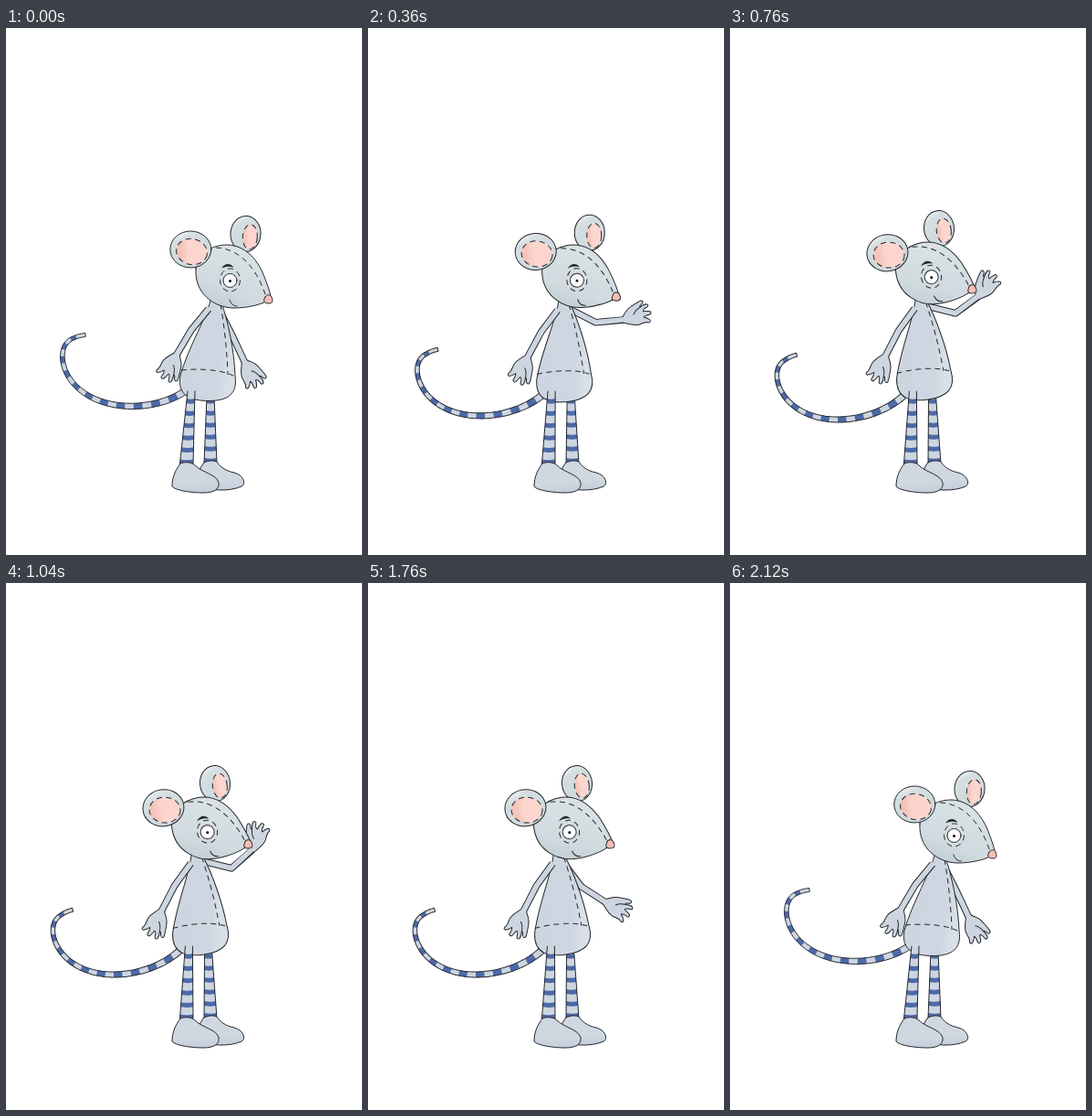
These frames come from a looping animation (390x576 px, 3600 ms). An HTML page:

```html
<!DOCTYPE html>
<html lang="en">
<head>
<meta charset="utf-8">
<title>Waving mouse</title>
<style>
html, body { margin: 0; width: 100%; height: 100%; overflow: hidden; background: #fff; }
svg { display: block; width: 100%; height: 100%; }
.ln { stroke: #25282c; stroke-width: 1; stroke-linejoin: round; stroke-linecap: round; }
.no { fill: none; }
.dash { stroke-dasharray: 6 4.5; stroke-linecap: butt; }
.skin { fill: #cdd6e0; }
.blue { fill: #4d69a9; }
.limb { fill: none; stroke-linejoin: round; }
.edge { stroke: #25282c; stroke-width: 7.6; }
.core { stroke: #cdd6e0; stroke-width: 5.6; }
</style>
</head>
<body>
<svg viewBox="0 0 390 576">
  <defs>
    <linearGradient id="headFill" x1=".75" y1=".1" x2=".3" y2="1">
      <stop offset="0" stop-color="#dae2e5"/><stop offset=".7" stop-color="#d0dadf"/><stop offset="1" stop-color="#c1cfd4"/>
    </linearGradient>
    <linearGradient id="bodyFill" x1="0" y1="0" x2="1" y2=".3">
      <stop offset="0" stop-color="#ccd5df"/><stop offset=".85" stop-color="#ced7e1"/><stop offset="1" stop-color="#d8dfe7"/>
    </linearGradient>
    <linearGradient id="earFill" x1=".1" y1="0" x2=".6" y2="1">
      <stop offset=".05" stop-color="#f6f8f9"/><stop offset=".25" stop-color="#d5dfe2"/><stop offset="1" stop-color="#ccd8dc"/>
    </linearGradient>
    <linearGradient id="shoeFill" x1=".4" y1="0" x2=".5" y2="1">
      <stop offset=".7" stop-color="#cfd7e1"/><stop offset="1" stop-color="#c3cdd9"/>
    </linearGradient>
    <linearGradient id="pink" x1="0" y1=".6" x2="1" y2=".4">
      <stop offset=".15" stop-color="#f5c3b8"/><stop offset=".4" stop-color="#fbd5ce"/>
    </linearGradient>
    <g id="hand">
      <path class="ln skin" d="M-1-3C3-6 6-10 12-11C16-12 21-13.500 24-13.500C27-13.500 27-10.500 24-9.500C22-9 21-8 21-7C24-8 27-8.500 29-8C31-7 30.500-4.500 28-4.500C25-4 23-3 23-1.500C26-1 28 0 30 1C31.500 3 29.500 5 28 4C25 3.500 23 3.500 21.500 4.500C24 6 26 8 27 10C27 12.500 24.500 12.500 23 11C20 10 17 10.500 14 10.500C8 10 4 6-1 3"/>
      <path class="ln no" d="M21-7C17-6 14-5 12-2"/>
    </g>
  </defs>

  <g id="tail"></g>

  <g id="farArm">
    <path class="limb edge"/>
    <use href="#hand"/>
    <path class="limb core"/>
  </g>

  <g id="farLeg"></g>
  <path class="ln" fill="url(#shoeFill)" d="M217 475C212 480 208 492 212 500C222 506 245 507 258 501C263 499 261 489 250 486C240 484 234 479 231 474C226 472 221 473 217 475Z"/>

  <g id="torso">
    <path class="ln" fill="url(#bodyFill)" d="M225 294C221 315 199 350 191 380C187 402 203 407.500 222 407.500C243 407.500 254 400 251 380C250 352 243 320 236 300Z"/>
    <path class="ln no dash" d="M235 302C239 325 242 350 243 379"/>
    <path class="ln no dash" d="M192 374C210 372 235 373 249 380"/>
  </g>

  <g id="nearLeg"></g>
  <path class="ln" fill="url(#shoeFill)" d="M191 476C186 483 182 490 182 501C186 506 205 508 216 508C228 508 234 504 233 497C231 488 215 486 207 478C203 474 195 474 191 476Z"/>

  <g id="nearArm">
    <path class="limb edge" d="M222 307L203 330L187 357"/>
    <use href="#hand" transform="translate(187 357) rotate(117)"/>
    <path class="limb core" d="M222.7 306L203 330L186 358.5"/>
  </g>

  <g id="head">
    <g transform="rotate(4 263 225)">
      <ellipse class="ln" fill="url(#earFill)" cx="262.500" cy="225" rx="16.500" ry="19.500"/>
      <ellipse class="ln dash" fill="url(#pink)" cx="267.500" cy="228" rx="8" ry="13.500"/>
    </g>
    <path class="ln" fill="url(#headFill)" d="M208 263C210 246 225 237 243 237C262 238 274 252 281 267C286 279 289 288 290 293C290 300 268 306 250 306C228 306 206 290 208 263Z"/>
    <path class="ln no dash" d="M230 240C256 241 274 262 284 291"/>
    <ellipse class="ln" fill="url(#earFill)" cx="202.300" cy="242" rx="22.500" ry="20"/>
    <ellipse class="ln dash" fill="url(#pink)" cx="203.500" cy="244.500" rx="17" ry="14" transform="rotate(12 203.500 244.500)"/>
    <ellipse class="ln no dash" cx="245.500" cy="275.500" rx="11" ry="12.500"/>
    <circle class="ln" fill="#fff" cx="245.500" cy="276" r="7.500"/>
    <circle cx="245.500" cy="276.500" r="1.500" fill="#111"/>
    <path fill="#25282c" d="M236 262.500C240 257 246 256.500 249.500 262C245 260 241 260.500 236 262.500Z"/>
    <path class="ln no" d="M245 297C246 301 249 304 253 304"/>
    <path class="ln" fill="#f6bdb6" d="M284 294C285 291 290 291 291 294C293 299 291.500 301 288 301C283 301 281 299 284 294Z"/>
  </g>
</svg>

<script>
const $ = id => document.getElementById(id);
const NS = 'http://www.w3.org/2000/svg';
const LOOP = 3600, STEP = 40, RAD = Math.PI / 180;

function add(parent, cls, d) {
  const p = document.createElementNS(NS, 'path');
  p.setAttribute('class', cls);
  p.setAttribute('d', d);
  parent.appendChild(p);
  return p;
}

const poly = pts => 'M' + pts.map(p => p[0].toFixed(2) + ' ' + p[1].toFixed(2)).join('L');

// Tapered tail cut into alternating bands
function buildTail() {
  const g = $('tail');
  const spine = add(g, 'no', 'M196 397C165 418 110 420.500 80 394.500C58 376 56 345 74 339C78 337 82 336 87 335.500');
  const len = spine.getTotalLength(), n = 96, per = 4;
  const left = [], right = [];
  for (let i = 0; i <= n; i++) {
    const u = 1 - Math.pow(1 - i / n, 1.2), s = u * len;
    const p = spine.getPointAtLength(s);
    const a = spine.getPointAtLength(Math.max(0, s - .5));
    const b = spine.getPointAtLength(Math.min(len, s + .5));
    const d = Math.hypot(b.x - a.x, b.y - a.y), w = 3.6 - 1.6 * u;
    const nx = -(b.y - a.y) / d * w, ny = (b.x - a.x) / d * w;
    left.push([p.x + nx, p.y + ny]);
    right.push([p.x - nx, p.y - ny]);
  }
  const shape = (i, j) => left.slice(i, j + 1).concat(right.slice(i, j + 1).reverse());
  const outline = poly(shape(0, n)) + 'Z';
  add(g, 'skin', outline);
  for (let i = per; i < n - per; i += 2 * per) add(g, 'blue', poly(shape(i, i + per)) + 'Z');
  add(g, 'ln no', outline);
}

// Striped leg: top and ankle edges, top height, stripe spacing
function buildLeg(id, l0, r0, l1, r1, top, gap) {
  const g = $(id), ankle = 476;
  const mix = (a, b, y) => a + (b - a) * (y - top) / (ankle - top);
  const l = y => mix(l0, l1, y), r = y => mix(r0, r1, y);
  add(g, 'skin', `M${l0} ${top}L${l1} ${ankle}L${r1} ${ankle}L${r0} ${top}Z`);
  for (let i = 0; i < 6; i++) {
    const y = 405 + i * gap, e = y + 5;
    add(g, 'blue', `M${l(y)} ${y}Q${(l(y) + r(y)) / 2} ${y + 1.5} ${r(y)} ${y}L${r(e)} ${e}Q${(l(e) + r(e)) / 2} ${e + 1.5} ${l(e)} ${e}Z`);
  }
  add(g, 'ln no', `M${l0} ${top}L${l1} ${ankle}M${r0} ${top}L${r1} ${ankle}`);
}

const times = [0, 360, 560, 760, 1040, 1100, 1400, 1680, 1760, 2120];
const keys = {
  lean:  [0, .73, 1, 1, 1, 1, 1, 1, 1, 0],
  nod:   [0, .37, 1, 1, 1, 1, 1, 1, 1, 0],
  dip:   [0, 2, 0, 0, 0, 0, 0, 0, 0, 0],
  upper: [63, 27, 20, 14, 14, 14, 14, 44, 53, 63],
  lower: [65, -5, -20, -36, -41, -44, -36, 14, 33, 65],
  hand:  [62, -20, -36, -55, -74, -80, -55, 4, 25, 62]
};

// Monotone cubic through the key poses
function track(v, t) {
  const last = times.length - 1;
  if (t >= times[last]) return v[last];
  let i = 0;
  while (t >= times[i + 1]) i++;
  const slope = k => (v[k + 1] - v[k]) / (times[k + 1] - times[k]);
  const tangent = k => {
    if (k === 0 || k === last) return 0;
    const a = slope(k - 1), b = slope(k);
    return a * b <= 0 ? 0 : 2 * a * b / (a + b);
  };
  const h = times[i + 1] - times[i], u = (t - times[i]) / h, w = 1 - u;
  return v[i] * (1 + 2 * u) * w * w + v[i + 1] * u * u * (3 - 2 * u)
    + h * u * w * (tangent(i) * w - tangent(i + 1) * u);
}

function polar(p, deg, r) {
  return [p[0] + r * Math.cos(deg * RAD), p[1] + r * Math.sin(deg * RAD)];
}

function draw(t) {
  const k = {};
  for (const name in keys) k[name] = track(keys[name], t);

  const turn = -8.5 * k.lean, hx = 220 - 8 * k.lean, hy = 385 - k.lean + k.dip;
  const c = Math.cos(turn * RAD), s = Math.sin(turn * RAD);
  const onBody = (x, y) => [hx + (x - 220) * c - (y - 385) * s, hy + (x - 220) * s + (y - 385) * c];
  const sway = y => `translate(${hx} ${y}) rotate(${turn}) translate(-220 -385)`;
  const set = (id, v) => $(id).setAttribute('transform', v);

  set('torso', sway(hy));
  set('tail', sway(385 + 1.5 * k.lean));
  set('nearArm', `${sway(hy)} rotate(${5.1 * k.lean} 222 306)`);
  const neck = onBody(230, 300);
  set('head', `translate(${neck}) rotate(${-9.5 * k.nod}) translate(-230 -300)`);

  const skew = `translate(0 476) skewX(${1.9 * k.lean}) translate(0 -476)`;
  set('nearLeg', skew);
  set('farLeg', skew);

  const shoulder = onBody(232, 305);
  const elbow = polar(shoulder, k.upper, 36);
  const wrist = polar(elbow, k.lower, 31);
  const [edge, hand, core] = $('farArm').children;
  edge.setAttribute('d', poly([shoulder, elbow, wrist]));
  core.setAttribute('d', poly([shoulder, elbow, polar(wrist, k.hand, 1.5)]));
  hand.setAttribute('transform', `translate(${wrist}) rotate(${k.hand})`);
}

buildTail();
buildLeg('nearLeg', 199, 207, 190.5, 205, 397, 13.3);
buildLeg('farLeg', 220, 228, 217, 231, 402, 13);

const start = performance.now();
function tick() {
  const t = (performance.now() - start) % LOOP;
  draw(Math.floor(t / STEP) * STEP);
  requestAnimationFrame(tick);
}
tick();
</script>
</body>
</html>
```
